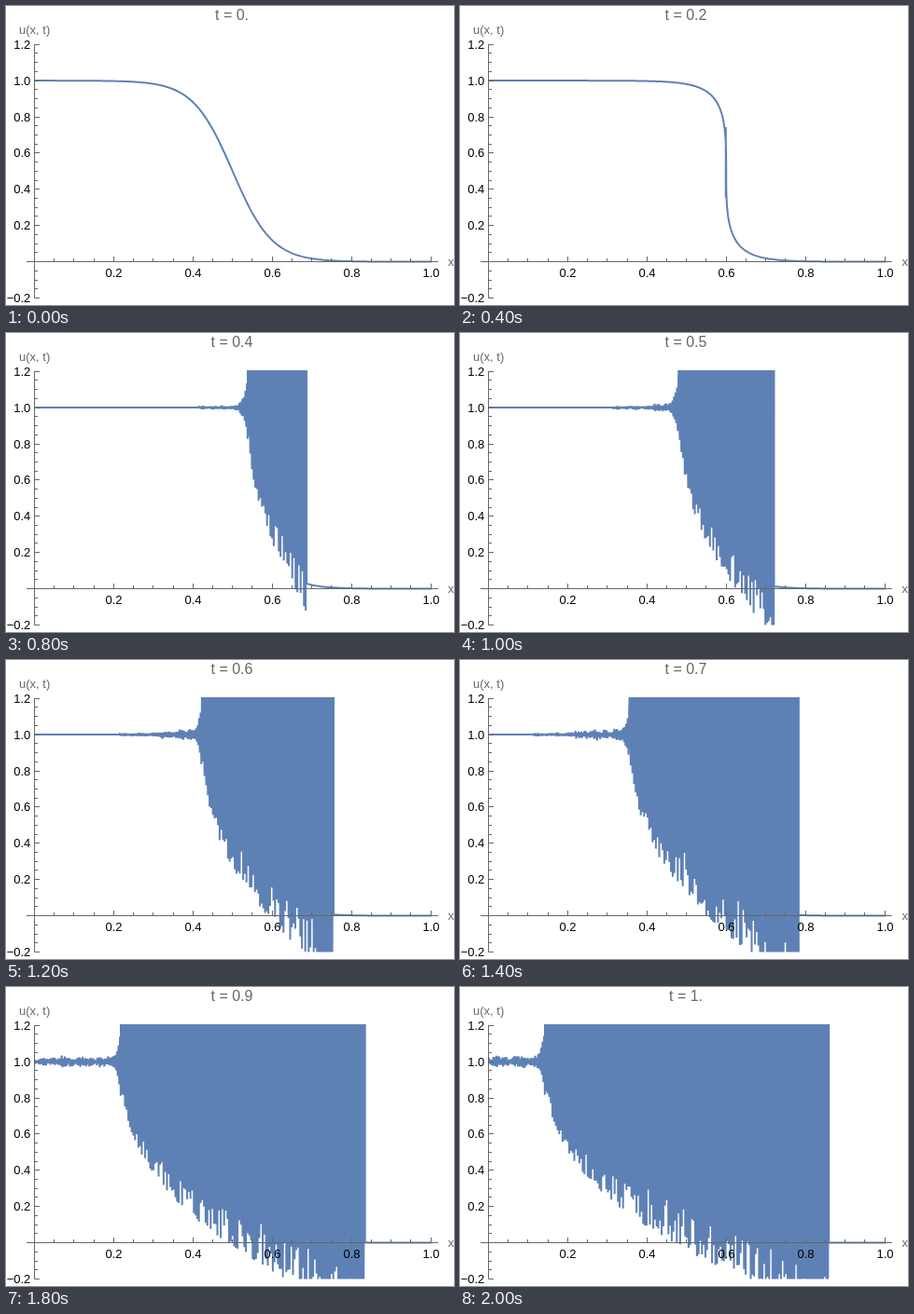
Recreate the animation shown at these times as an HTML page. Size 480 px wide and 321 px high, loop 2.1 s.

```html
<!DOCTYPE html>
<html lang="en">
<head>
<meta charset="utf-8">
<title>Breaking wave</title>
<style>
  html, body { margin: 0; width: 100%; height: 100%; overflow: hidden; background: #fff; }
  svg { display: block; width: 480px; height: 321px; }
  text { font: 13px "Liberation Sans", Arial, sans-serif; }
  .grey { fill: #666; }
  #time { font-size: 16px; text-anchor: middle; }
  #wave { fill: none; stroke: #5e81b5; stroke-width: 2; stroke-linejoin: bevel; }
  #axes { fill: none; stroke: #666; stroke-width: 1; }
</style>
</head>
<body>
<svg viewBox="0 0 480 321">
  <clipPath id="plot"><rect x="30" y="40" width="426" height="273.5"/></clipPath>
  <g clip-path="url(#plot)"><path id="wave"/></g>
  <path id="axes"/>
  <g id="labels"></g>
  <text class="grey" x="14" y="30">u(x, t)</text>
  <text class="grey" x="473.5" y="279">x</text>
  <text class="grey" id="time" x="242" y="15"></text>
</svg>
<script>
const X0 = 30.5, XS = 424.5, Y0 = 274.6, YS = 194.5;
const STEP = 100, STEPS = 21, BREAK = 0.2;
const $ = id => document.getElementById(id);
const px = x => X0 + XS * x;
const py = u => Y0 - YS * u;

// Edges of the unstable zone in pixels: time, left, right
const EDGES = [
  [0.2, 285, 285], [0.3, 274, 304.5], [0.4, 259, 322.3], [0.6, 210, 351.3],
  [0.8, 154, 375], [0.9, 123, 385], [1, 91, 395.5]
];

function edge(t, side) {
  let k = 1;
  while (k < EDGES.length - 1 && EDGES[k][0] < t) k++;
  const a = EDGES[k - 1], b = EDGES[k];
  return a[side] + (b[side] - a[side]) * (t - a[0]) / (b[0] - a[0]);
}

function randomFrom(seed) {
  return () => {
    seed = (seed + 0x6d2b79f5) | 0;
    let r = Math.imul(seed ^ (seed >>> 15), 1 | seed);
    r = (r + Math.imul(r ^ (r >>> 7), 61 | r)) ^ r;
    return ((r ^ (r >>> 14)) >>> 0) / 4294967296;
  };
}

// Inviscid Burgers flow: each value travels along its characteristic
const start = s => (1 - Math.tanh(10 * (s - 0.5))) / 2;
function carried(s, t) {
  const u = start(s);
  return [px(s + u * t), py(u)];
}

const toPath = pts => "M" + pts.map(p => p[0].toFixed(2) + " " + p[1].toFixed(2)).join("L");

function smoothWave(t) {
  const pts = [];
  for (let s = -0.3; s <= 1.01; s += 0.0025) pts.push(carried(s, t));
  return toPath(pts) + (Math.abs(t - BREAK) < 1e-6 ? "M284.8 130V206" : "");
}

function brokenWave(t, seed) {
  const rand = randomFrom(seed * 977);
  const left = edge(t, 1), right = edge(t, 2);
  const front = px(0.815 - t), drop = 46 - 20 * t;
  const pts = [], tail = [];
  let sign = 1;

  // Calm crest, then small ripples that burst towards the left edge
  let s = -1.1, p = carried(s, t);
  for (let x = X0 - 2; x < left; x += 0.8) {
    while (p[0] < x && s < 0.5) p = carried(s += 0.001, t);
    let amp = 0;
    if (x > front) {
      const d = x - front;
      const beat = 0.75 + 0.25 * Math.sin(d * 0.45) * Math.sin(d * 0.17);
      amp = (2.2 + 4 / (1 + Math.exp((45 - d) / 4)) + 0.01 * d) * beat * (0.4 + 0.6 * rand());
      amp += 33 * Math.exp((x - left) / 3);
    }
    pts.push([x, p[1] + sign * amp]);
    sign = -sign;
  }

  // Unstable zone: the line swings between the top and a ragged lower edge
  for (let x = left; x < right - 1; x += 1.8) {
    const d = x - left;
    const lump = Math.max(0, Math.sin(x * 0.33 + seed * 2.1)) ** 4;
    const ragged = 1.05 - 0.2 * rand() ** 2 - 0.08 * lump * rand();
    const depth = Math.max(33, drop * d ** 0.4) * ragged + 25 * (d / (right - left)) ** 8;
    pts.push([x, 30], [x + 0.9, 80 + depth]);
  }
  pts.push([right - 0.8, 30], [right - 0.3, 30]);

  for (let s = 1.02; s > 0.5; s -= 0.002) {
    const q = carried(s, t);
    if (q[0] < right) break;
    tail.unshift(q);
  }
  return toPath(pts.concat([[right - 0.3, tail[0][1]]], tail));
}

function drawAxes() {
  let d = "M22 274.5H463M30.5 41V313.5";
  let labels = "";
  for (let i = -4; i <= 24; i++) {
    const v = i / 20, major = i % 4 === 0;
    const size = major ? 5.5 : 3.5;
    const y = Math.floor(py(v)) + 0.5, x = Math.floor(px(v)) + 0.5;
    const name = v.toFixed(1).replace("-", "\u2212");
    if (i) {
      d += `M30.5 ${y}h${size}`;
      if (major) labels += `<text x="26.3" y="${y + 4.5}" text-anchor="end">${name}</text>`;
    }
    if (i > 0 && i <= 20) {
      d += `M${x} 274.5v${-size}`;
      if (major) labels += `<text x="${x}" y="291" text-anchor="middle">${name}</text>`;
    }
  }
  $("axes").setAttribute("d", d);
  $("labels").innerHTML = labels;
}

let shown = -1;
function tick() {
  const step = Math.floor(performance.now() / STEP) % STEPS;
  if (step !== shown) {
    shown = step;
    const t = step / 20;
    $("time").textContent = "t = " + (t % 1 ? t : t + ".");
    $("wave").setAttribute("d", t <= BREAK ? smoothWave(t) : brokenWave(t, step));
  }
  requestAnimationFrame(tick);
}

drawAxes();
tick();
</script>
</body>
</html>
```
